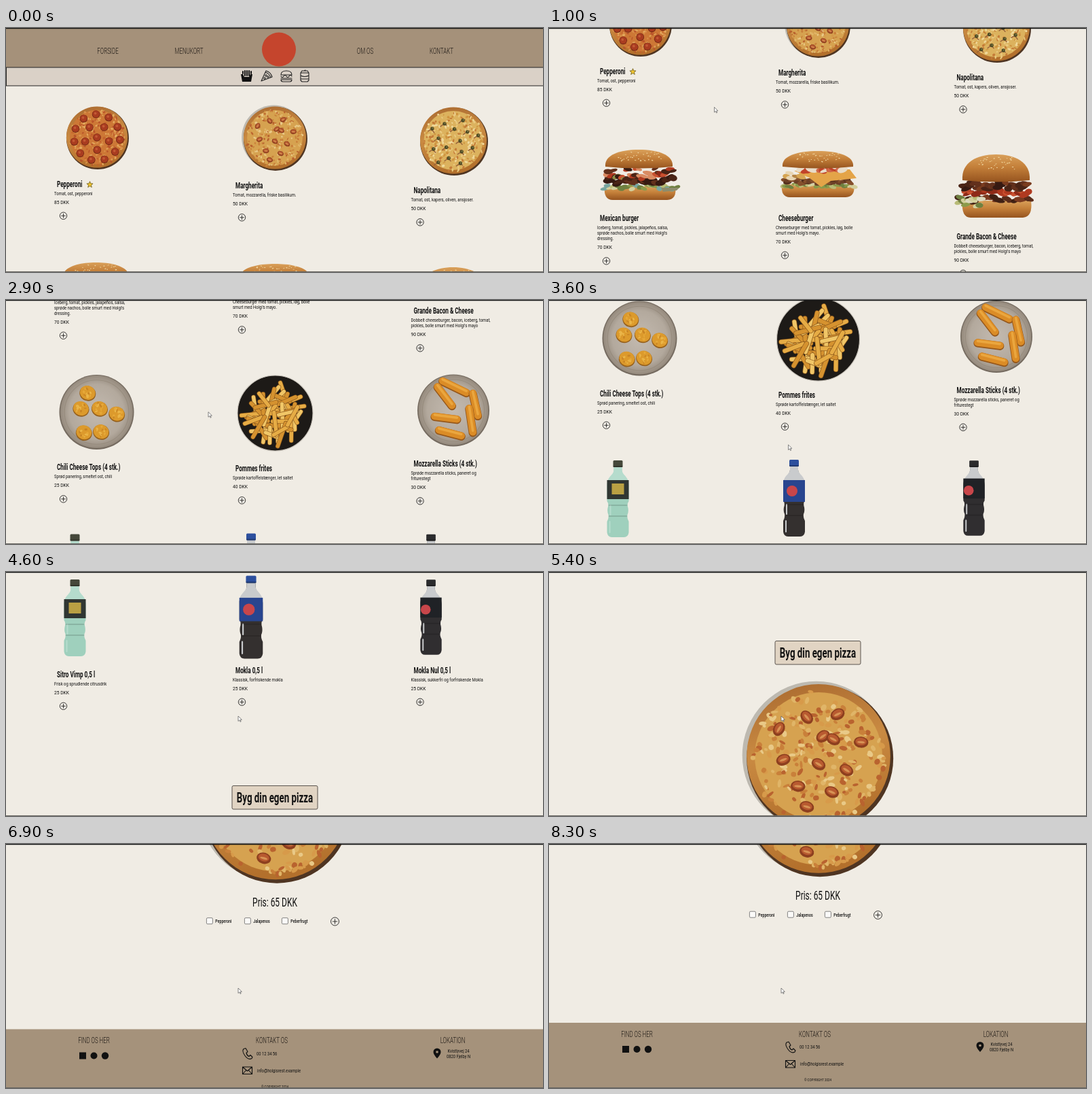
Write an HTML page that moves like this. It is 791 by 359 pixels and loops after 8400 ms.

```html
<!DOCTYPE html>
<html lang="da">
<head>
<meta charset="utf-8">
<style>
html, body { margin: 0; width: 100%; height: 100%; overflow: hidden; background: #f0ece4; }
svg { display: block; width: 100vw; height: 100vh; }
text { font-family: Roboto, "Liberation Sans", sans-serif; }
</style>
</head>
<body>
<svg id="stage" viewBox="0 0 791 359"></svg>
<script>
let seed = 7;
const rnd = (a = 0, b = 1) => {
  seed = (seed * 16807) % 2147483647;
  return a + (b - a) * seed / 2147483647;
};
const pick = list => list[Math.floor(rnd(0, list.length))];

// Shape helpers
const group = (x, y, body, k = 1, id = '') =>
  `<g transform="translate(${x} ${y}) scale(${k})"><g id="${id}">${body}</g></g>`;
const disc = (x, y, r, fill, more = '') => `<circle cx="${x}" cy="${y}" r="${r}" fill="${fill}" ${more}/>`;
const rect = (x, y, w, h, fill, more = '') =>
  `<rect x="${x}" y="${y}" width="${w}" height="${h}" fill="${fill}" ${more}/>`;
const path = (d, fill, more = '') => `<path d="${d}" fill="${fill}" ${more}/>`;
const line = (d, color, w) =>
  path(d, 'none', `stroke="${color}" stroke-width="${w}" stroke-linecap="round" stroke-linejoin="round"`);
const oval = (x, y, rx, ry, turn, fill) =>
  `<ellipse rx="${rx.toFixed(1)}" ry="${ry.toFixed(1)}" fill="${fill}" transform="translate(${x.toFixed(1)} ${y.toFixed(1)}) rotate(${turn.toFixed()})"/>`;

// Text centred vertically on y; each style is [size, weight, narrowness]
const HEAD = [12, 700, .68], BODY = [6.7, 400, .88], PRICE = [7.6, 400, .88], NAV = [12.4, 300, .64],
      BIG = [19.6, 700, .68], SUM = [17.6, 400, .68], TICK = [7.75, 500, .68],
      INFO = [6.6, 400, .88], TINY = [5.1, 400, .88];
const text = (x, y, s, [size, weight, narrow], anchor = 'start', fill = '#111') =>
  `<text transform="translate(${x} ${y + size * .355}) scale(${narrow} 1)" font-size="${size}" font-weight="${weight}" text-anchor="${anchor}" fill="${fill}">${s}</text>`;

const scatter = (n, r, size, colors) => Array.from({ length: n }, () => {
  const a = rnd(0, 6.283), d = r * Math.sqrt(rnd());
  return oval(d * Math.cos(a), d * Math.sin(a), size * rnd(.6, 1.5), size * rnd(.4, 1), rnd(0, 180), pick(colors));
}).join('');
const strip = (n, x0, x1, y0, y1, size, colors) => Array.from({ length: n }, (_, i) =>
  oval(x0 + (x1 - x0) * (i + rnd()) / n, rnd(y0, y1), size * rnd(.9, 1.6), size * rnd(.4, .8), rnd(-25, 25), pick(colors))
).join('');
const plus = (x, y, r = 5.2) => disc(x, y, r, 'none', 'stroke="#222" stroke-width=".9"') +
  line(`M${x - r * .55} ${y}h${r * 1.1}M${x} ${y - r * .55}v${r * 1.1}`, '#222', .9);

// Food, drawn around a centre with radius 50
const pizza = (x, y, r, cheese, specks, topping) => group(x, y,
  disc(1, 1, 50, '#4f3522') + disc(0, -.5, 49, 'url(#crust)') + disc(0, -.5, 43.5, cheese) +
  scatter(260, 45, 1.9, specks) + topping, r / 50);

const pepperoni = [[1, 0, 0], [5, 20, .3], [11, 37, .1]].map(([n, r, off]) =>
  Array.from({ length: n }, (_, i) => {
    const a = off + i * 6.283 / n, x = r * Math.cos(a), y = r * Math.sin(a);
    return disc(x, y, 6.3, '#6e2614') + disc(x, y - .4, 5.6, '#a93c20') + disc(x - 1, y - 1.5, 2, '#c35a35');
  }).join('')).join('');

const tomatoes = [[-27, -19], [-8, -27], [13, -29], [3, -14], [10, -12], [29, -10], [-24, 2], [0, 5],
  [19, 9], [-14, 20], [9, 24], [-8, 34]].map(([x, y]) => {
    const turn = rnd(-60, 60);
    return oval(x, y, 5, 3.8, turn, '#8d3f1f') + oval(x, y - .5, 3.8, 2.6, turn, '#b85a30') + oval(x, y, 2.6, .8, turn, '#d79355');
  }).join('');

const olives = Array.from({ length: 15 }, (_, i) => {
  const a = i * 2.4, r = 10 * Math.sqrt(i + 1), x = r * Math.cos(a), y = r * Math.sin(a);
  return line(`M${x - 6} ${y + 4}q5 -5 9 ${rnd(-6, 3)}`, '#96603a', 1.4) + disc(x, y, 2.7, '#4c4a26') + disc(x + .6, y - .6, 1, '#8a8144');
}).join('');

const gold = ['#e0b568', '#c9803a', '#e9c987', '#b9632f', '#d79a4a'];
const margherita = (x, y, r) => disc(x - r * .03, y - r * .02, r * 1.01, '#bdb9b0') +
  pizza(x, y, r, '#d6a250', gold, tomatoes);

const sesame = (x0, x1, y0, y1) => strip(34, x0, x1, y0, y1, .9, ['#f4dfae', '#f0d398']);
const bottomBun = (x, y, w, h) =>
  path(`M${x} ${y}h${w}q3 ${h * .95} -12 ${h}h${24 - w}q-14 0 -12 ${-h}z`, 'url(#bun)');
const topBun = (x, y, w, h) =>
  path(`M${x} ${y + h}C${x - 2} ${y + h * .3} ${x + w * .22} ${y} ${x + w / 2} ${y}S${x + w + 2} ${y + h * .3} ${x + w} ${y + h}q${-w / 2} 5 ${-w} 0z`, 'url(#bun)');
const GREEN = ['#8b9a4a', '#b8bb76', '#d3cf9c', '#6f8040'], MEAT = ['#4a2416', '#62301c', '#361a12'],
      RED = ['#b03a20', '#c9502f', '#8e2a18'];

const mexican = bottomBun(5, 54, 104, 20) + strip(26, 3, 112, 52, 58, 4.5, GREEN.concat('#78a6a0')) +
  strip(24, 8, 106, 40, 50, 6, MEAT) + strip(34, 7, 106, 27, 43, 5, RED.concat(MEAT, '#d98b62', '#8f8f48')) +
  path('M88 56l27 0l-4 4l-20 2z', '#8d8c6c') + topBun(6, 0, 99, 25) + sesame(25, 88, 3, 17);
const cheeseburger = bottomBun(4, 49, 106, 19) + strip(26, 4, 110, 49, 53, 4, GREEN) +
  strip(26, 6, 108, 42, 48, 5, ['#6d4127', '#85502c', '#55301d']) + strip(18, 7, 104, 32, 40, 5, ['#d6a553', '#e8d5b2', '#b58342']) +
  path('M22 29L104 27L114 40L76 44L62 53L44 39z', '#e4a448') +
  strip(18, 30, 94, 22, 30, 6, ['#c1432a', '#e9dcc8', '#d0674a']) + topBun(5, 0, 104, 23) + sesame(25, 90, 3, 16);
const grande = bottomBun(11, 68, 101, 25) + strip(24, 4, 112, 62, 70, 5, ['#402014', '#5a2c1a', '#7a3a20']) +
  strip(12, 3, 40, 61, 77, 5, GREEN.concat('#dcd8bd')) + strip(18, 14, 112, 53, 60, 6, RED) +
  strip(26, 12, 108, 40, 51, 6, MEAT.concat('#7a3c1f')) + topBun(11, 0, 99, 38) + sesame(35, 88, 4, 22);

const plate = disc(0, 0, 50, '#756b60') + disc(0, -.5, 48.5, 'url(#plate)') +
  disc(0, 0, 43, 'none', 'stroke="#978c7e" stroke-width="1"');
const nuggets = [[-12, -26], [-21, -5], [4, -5], [27, 2], [-17, 27], [6, 26]].map(([x, y]) =>
  oval(x, y + 1, 11, 10, 20, '#96601c') + oval(x, y, 10.4, 9.4, 20, '#dc9a2c') +
  group(x, y, scatter(12, 7, 1.8, ['#eab548', '#c98424', '#e6a838']))).join('');
const sticks = [[-15, -41, 33, 16], [-22, -33, 20, 26], [27, -24, 7, 31], [22, -3, 5, 33], [-26, 8, 31, 4], [-20, 27, 31, 8]]
  .map(([x, y, w, h]) => [['#96571a', 11.5, 1], ['#db8c26', 10, 0], ['#eaa63e', 3.5, -2]]
    .map(([c, s, d]) => line(`M${x} ${y + d}l${w} ${h}`, c, s)).join('')).join('');
const fries = Array.from({ length: 56 }, () => {
  const a = rnd(0, 6.283), r = 31 * Math.sqrt(rnd()), t = rnd(-2.4, .5), l = rnd(9, 17),
        dx = l * Math.cos(t), dy = l * Math.sin(t), x = r * Math.cos(a) - dx, y = r * Math.sin(a) - dy,
        d = `M${x} ${y}l${2 * dx} ${2 * dy}`;
  return line(d, '#8f5a1c', 6) + line(d, pick(['#e6ac45', '#d5922f', '#f0c667']), 4.8);
}).join('');

// Bottle centred on its own middle, 113 high
const BOTTLE = 'M-6 10V15C-7 24-16 25-16 37V60Q-13 64-15 70Q-16 76-14 80Q-13 84-16 90V106Q-15 113-9 113H9Q15 113 16 106V90Q13 84 14 80Q16 76 15 70Q13 64 16 60V37C16 25 7 24 6 15V10Z';
const bottle = (cap, glass, drink, label, y, h, mark) => group(0, -56.5,
  path(BOTTLE, drink) + path('M-6 10V15C-7 21-13 23-15 30H15C13 23 7 21 6 15V10Z', glass) +
  line('M-11 66v14M-12 90v16', glass, 2) + line('M-13 82h26M-13 66h26', '#0002', 2) +
  rect(-16, y, 32, h, label) + mark + rect(-7, 0, 14, 10, cap, 'rx="1.5"') + rect(-7, 8, 14, 2, '#0004'));
const lemonade = bottle('#45483a', '#b5dccd', '#9fd0bd', '#303632', 29, 28, rect(-9, 34, 18, 16, '#b9a043'));
const cola = bottle('#2c4f9d', '#c9cbcd', '#34302f', '#28458f', 30, 32, disc(-3, 46, 8, '#c8464a'));
const colaZero = bottle('#2b2b2d', '#c9cbcd', '#302e30', '#202226', 27, 30, disc(-8, 45, 7.5, '#c8464a'));

const COLS = [71, 334, 596.5];
const card = (col, y, title, lines, price) => {
  const x = COLS[col], end = y + 8 * (lines.length - 1);
  return text(x + 4, y, title, HEAD) + lines.map((s, i) => text(x, y + 14 + 8 * i, s, BODY)).join('') +
    text(x, end + 26.7, price + ' DKK', PRICE) + plus(x + 13.5, end + 46.8);
};

const starPoints = Array.from({ length: 10 }, (_, i) => {
  const r = i % 2 ? 2.1 : 4.8, a = i * Math.PI / 5;
  return [123.5 + r * Math.sin(a), 230.5 - r * Math.cos(a)];
}).join(' ');

const header = rect(0, 0, 791, 58, '#a5917a') + rect(.5, 58, 795, 27, '#dad1c7', 'stroke="#222"') +
  [[150, 'FORSIDE'], [269.5, 'MENUKORT'], [529, 'OM OS'], [641.5, 'KONTAKT']]
    .map(([x, s]) => text(x, 34, s, NAV, 'middle', '#1c1713')).join('') +
  disc(402, 31.5, 25, '#c5452d') +
  // category icons
  path('M346 68h3l2 4h7l2-4h3l-2 11h-13z', '#111') + line('M349 67v-3M352 70v-7M355 70v-7M358 70v-7M361 67v-3', '#111', 2) +
  line('M376 78l7-15q7 2 9 9zM382 65q6 2 8 8', '#222', 1.1) +
  [[383, 70], [386, 72], [381, 74]].map(([x, y]) => disc(x, y, 1.3, 'none', 'stroke="#222"')).join('') +
  line('M405 69q0-6 8-6t8 6zM405 71q2 3 4 0t4 0t4 0t4 0M405 74h16M405 76h16q0 3-3 3h-10q-3 0-3-3z', '#222', 1.1) +
  line('M436 63h8l2 3v11l-2 2h-8l-2-2v-11zM434 66h12M434 70q6 3 12 0M434 75h12M439 63l2-1', '#222', 1.1);

const menu =
  pizza(134, 161, 46, '#cd7836', ['#d9904a', '#b9542a', '#e3aa5e', '#c4632c'], pepperoni) +
  margherita(396, 162, 47) + pizza(659, 166, 50, '#dcb25e', ['#e9c87e', '#cf9440', '#f0d99c', '#c47b38'], olives) +
  card(0, 229.5, 'Pepperoni', ['Tomat, ost, pepperoni'], 85) +
  `<polygon points="${starPoints}" fill="#f0c52e" stroke="#6b5a1c" stroke-width=".8"/>` +
  card(1, 232, 'Margherita', ['Tomat, mozzarella, friske basilikum.'], 50) +
  card(2, 239, 'Napolitana', ['Tomat, ost, kapers, oliven, ansjoser.'], 50) +
  group(77, 345, mexican) + group(339, 347, cheeseburger) + group(598, 352, grande) +
  card(0, 446, 'Mexican burger', ['Iceberg, tomat, pickles, jalapeños, salsa,', 'sprøde nachos, bolle smurt med Holgi\'s', 'dressing.'], 70) +
  card(1, 445.5, 'Cheeseburger', ['Cheeseburger med tomat, pickles, løg, bolle', 'smurt med Holgi\'s mayo.'], 70) +
  card(2, 472.5, 'Grande Bacon &amp; Cheese', ['Dobbelt cheeseburger, bacon, iceberg, tomat,', 'pickles, bolle smurt med Holgi\'s mayo'], 90) +
  group(133.5, 621.5, plate + nuggets, 1.1) +
  group(396.5, 623, disc(0, 0, 50, '#1d1a17', 'stroke="#c9c4bb" stroke-width="1"') + fries, 1.11, 'fries') +
  group(659, 619, plate + sticks, 1.06) +
  card(0, 702.5, 'Chili Cheese Tops (4 stk.)', ['Sprød panering, smeltet ost, chili'], 25) +
  card(1, 704.5, 'Pommes frites', ['Sprøde kartoffelstænger, let saltet'], 40) +
  card(2, 697.5, 'Mozzarella Sticks (4 stk.)', ['Sprøde mozzarella sticks, paneret og', 'friturestegt'], 30) +
  group(101.5, 857.5, lemonade) + group(361, 856.5, cola, 1, 'cola') + group(626, 856.5, colaZero, .98) +
  card(0, 940.5, 'Sitro Vimp 0,5 l', ['Frisk og sprudlende citrusdrik'], 25) +
  card(1, 934.5, 'Mokla 0,5 l', ['Klassisk, forfriskende mokla'], 25) +
  card(2, 934.5, 'Mokla Nul 0,5 l', ['Klassisk, sukkerfri og forfriskende Mokla'], 25) +
  rect(333, 1104.5, 126, 34.5, '#e1d4c3', 'rx="2" stroke="#4a4540" stroke-width=".9"') +
  text(396, 1122, 'Byg din egen pizza', BIG, 'middle');

const BUILD = 1165, END = BUILD + 172;
const builder = group(0, BUILD, margherita(397, 110, 108) +
  text(396, 248, 'Pris: 65 DKK', SUM, 'middle') +
  [[295, 'Pepperoni'], [351, 'Jalapenos'], [406, 'Peberfrugt']].map(([x, s]) =>
    rect(x + .4, 271.2, 9, 9, '#fbfaf8', 'rx="1.5" stroke="#666" stroke-width=".8"') + text(x + 13.3, 275.8, s, TICK)).join('') +
  plus(484.5, 276.5, 6));

const footer = group(0, END, rect(0, 263, 791, 96, '#a5927b') +
  [[129.5, 'FIND OS HER'], [391.5, 'KONTAKT OS'], [658, 'LOKATION']]
    .map(([x, s]) => text(x, 279.5, s, NAV, 'middle', '#1c1713')).join('') +
  rect(108, 297, 10, 10, '#111') + disc(129.5, 302, 5, '#111') + disc(146, 302, 5.2, '#111') +
  line('M350 292l3-1 3 5-2 2q1 4 4 5l2-2 3 3-1 2q-5 3-10-4-5-7-2-10z', '#111', 1.1) +
  line('M348.5 318.5h14v10.5h-14zl7 6 7-6M348.5 329l5-5.5M362.5 329l-5-5.5', '#111', 1.1) +
  path('M635 306q-5.5-6-5.5-9.5a5.5 5.5 0 0 1 11 0q0 3.5-5.5 9.5z', '#111') + disc(635, 296.5, 1.8, '#a5927b') +
  text(369, 299, '00 12 34 56', INFO) + text(370, 324, 'info@holgisrest.example', INFO) +
  text(666.5, 295, 'Kvistlyvej 24', INFO, 'middle') + text(666.5, 303, '0820 Fjelby N', INFO, 'middle') +
  text(396, 347.5, '© COPYRIGHT 2024', TINY, 'middle'));

const stops = list => list.map(([at, c]) => `<stop offset="${at}" stop-color="${c}"/>`).join('');
const stage = document.getElementById('stage');
stage.innerHTML = `<defs>
  <linearGradient id="crust" x1="0" y1="0" x2=".2" y2="1">${stops([[0, '#a9692f'], [.5, '#c98a42'], [1, '#b3702c']])}</linearGradient>
  <linearGradient id="bun" x1="0" y1="0" x2="0" y2="1">${stops([[0, '#d9a05a'], [.45, '#c4803a'], [1, '#96541f']])}</linearGradient>
  <radialGradient id="plate">${stops([[0, '#c3bab0'], [.75, '#b3a99d'], [1, '#958a7d']])}</radialGradient>
</defs>` + rect(0, 0, 791, 359, '#f0ece4') +
  `<g id="page">${header + menu + builder + footer}</g>` +
  `<g id="cursor">${path('M0 0v7.5l1.9-1.6 1.2 2.6 1.1-.5-1.2-2.5 2.4-.2z', '#fff', 'stroke="#555" stroke-width=".7"')}</g>` +
  rect(0, 0, 791, 1.2, '#111') + rect(0, 358, 791, 1, '#6b6963');

// Eased value between [time, value] keys
const ease = (keys, t) => {
  const i = keys.findIndex(k => k[0] > t);
  if (i < 0) return keys[keys.length - 1][1];
  if (!i) return keys[0][1];
  const [t0, a] = keys[i - 1], [t1, b] = keys[i], p = (t - t0) / (t1 - t0);
  return a + (b - a) * p * p * (3 - 2 * p);
};
const SCROLL = [[0, 0], [1000, 166], [1050, 166], [1950, 374], [2400, 374], [3500, 565], [3650, 565],
  [4550, 790], [4800, 790], [5900, BUILD], [6600, BUILD], [6950, END]];
const CURSOR_X = [[2500, 243.5], [3300, 352.5], [3700, 352.5], [4300, 342]];
const CURSOR_Y = [[2500, 116.5], [3300, 213], [3700, 213], [4300, 212]];
const FRIES = [[2900, 1], [3300, 1.1], [3800, 1.1], [4100, 1]];
const COLA = [[4000, 1], [4400, 1.08], [5000, 1.08], [5300, 1]];
const [page, cursor, friesBox, colaBox] = ['page', 'cursor', 'fries', 'cola'].map(id => document.getElementById(id));
const move = (el, value) => el.setAttribute('transform', value);

const start = performance.now();
function draw(now) {
  const t = Math.floor(Math.max(0, now - start) % 8400 / 100) * 100;
  move(page, `translate(0 ${-ease(SCROLL, t).toFixed(1)})`);
  move(cursor, `translate(${ease(CURSOR_X, t)} ${ease(CURSOR_Y, t)})`);
  cursor.setAttribute('opacity', t < 300 ? 0 : 1);
  move(friesBox, `scale(${ease(FRIES, t)})`);
  move(colaBox, `scale(${ease(COLA, t)})`);
  requestAnimationFrame(draw);
}
draw(start);
</script>
</body>
</html>
```
